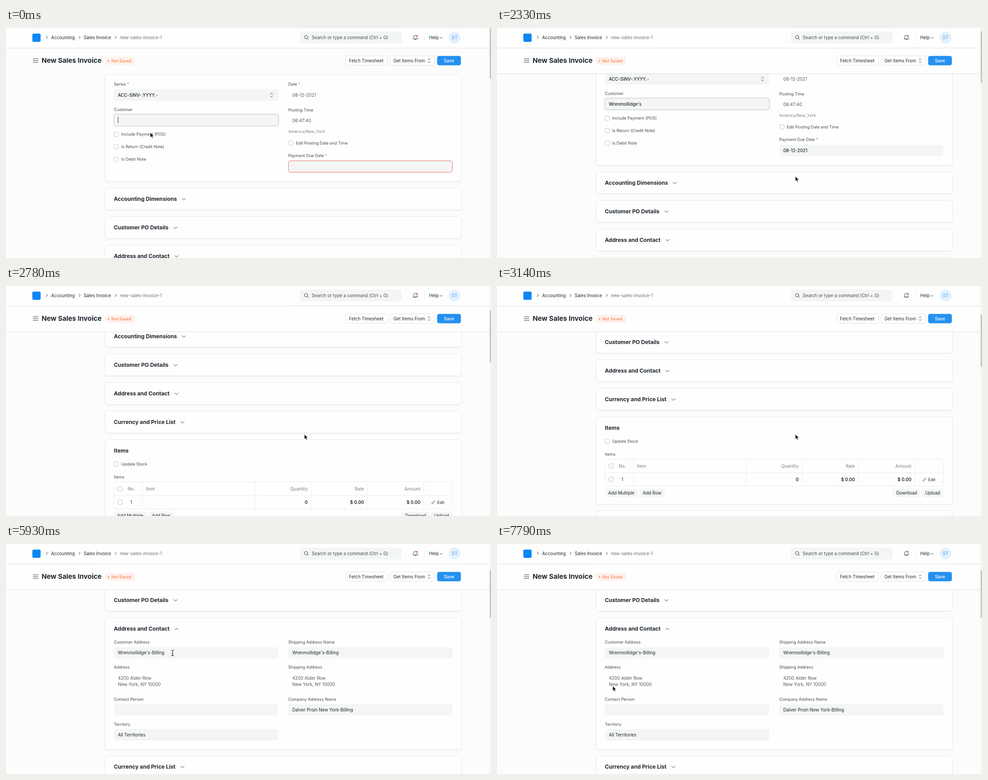
These frames come from a looping animation (1086x515 px, 8000 ms). An HTML page:

```html
<!DOCTYPE html>
<html lang="en">
<head>
<meta charset="utf-8">
<title>New Sales Invoice</title>
<style>
html, body { margin: 0; width: 100%; height: 100%; overflow: hidden; background: #fcfcfc; }
svg { display: block; width: 1086px; height: 515px; font-family: Inter, "Open Sans", sans-serif; }
text { white-space: pre; }
.card { fill: #fefefe; stroke: #e8ebec; filter: drop-shadow(0 1px 1px rgba(0, 0, 0, .07)); }
.field { fill: #f4f5f5; }
.line { fill: none; stroke: #e9ecee; }
.icon { fill: none; stroke: #333c44; stroke-linecap: round; stroke-linejoin: round; }
</style>
</head>
<body>
<svg id="stage" viewBox="0 0 1086 515" xmlns="http://www.w3.org/2000/svg"></svg>
<script>
const INK = '#1f272e', LABEL = '#414b54', VALUE = '#505a62', MUTED = '#78828b';
const SMALL = 9.12, BASE = 9.84, LARGE = 12.15, TITLE = 15.15;
const SHOP = "Wrenmollidge's", OWNER = 'Dalver Proin New York-Billing';
const STREET = '4200 Alder Row', CITY = 'New York, NY 10000';
const LOOP = 8000, EXPANDED = 3860, PICKED = 720, FILLED = 1250;

// Text is placed by its vertical centre.
const text = (x, cy, str, size = BASE, fill = INK, weight = 400, anchor = 'start', id = '') =>
  `<text ${id && `id="${id}"`} x="${x}" y="${cy + size * 0.364}" font-size="${size}" fill="${fill}" font-weight="${weight}" text-anchor="${anchor}">${str}</text>`;
const rect = (x, y, x2, y2, r, attrs) =>
  `<rect x="${x}" y="${y}" width="${x2 - x}" height="${y2 - y}" rx="${r}" ${attrs}/>`;
const path = (d, attrs = 'class="icon"') => `<path d="${d}" ${attrs}/>`;
const group = (id, body, attrs = '') => `<g id="${id}" ${attrs}>${body}</g>`;

const card = (y, y2) => rect(222, y, 1019.5, y2, 6, 'class="card"');
const field = (x, y, y2) => rect(x, y, x + 368, y2, 4.5, 'class="field"');
const label = (x, cy, str, required) =>
  text(x, cy, str + (required ? ' <tspan fill="#ec5f5f">*</tspan>' : ''), SMALL, LABEL);
const check = (x, cy, str) =>
  rect(x, cy - 5, x + 10, cy + 5, 3, 'fill="#fff" stroke="#bcc3c9"') +
  (str ? text(x + 16, cy, str, SMALL, LABEL) : '');
const updown = (x, y) => path(`M${x - 2.5} ${y - 2}l2.5 -2.5l2.5 2.5M${x - 2.5} ${y + 2}l2.5 2.5l2.5 -2.5`);
const chevron = (x, y, w, h, id = '') =>
  path(`M${x - w} ${y - h}l${w} ${2 * h}l${w} ${-2 * h}`, `class="icon" ${id && `id="${id}"`}`);
const crumb = x => path(`M${x - 1.5} 18l3 3l-3 3`);
const section = (y, title, cx, id) =>
  card(y, y + 49) + text(241.5, y + 25, title, LARGE, INK, 700) + chevron(cx, y + 25.3, 4, 2, id);
const button = (x, x2, str) =>
  rect(x, 775.5, x2, 793.5, 4.5, 'class="field"') +
  text((x + x2) / 2, 784.5, str, BASE, INK, 400, 'middle');
const headButton = (x, x2, str, tx) =>
  rect(x, 62.5, x2, 83.5, 4.5, 'fill="#fff" stroke="#dde1e4"') + text(tx, 73, str);

function mainCard() {
  const caret = rect(250.5, 199, 251.5, 213, 0, 'id="caret" fill="#222"');
  return card(105, 343) +
    label(241.5, 126, 'Series', true) + field(241.5, 137, 163) +
    text(250.5, 150, 'ACC-SINV-.YYYY.-', BASE, INK, 500) + updown(594.5, 150) +
    label(241.5, 183, 'Customer') +
    rect(241, 193, 610.3, 219.3, 5, 'fill="#f4f5f5" stroke="#cdd2d4" stroke-width="1.5"') +
    text(250.5, 206, '', BASE, INK, 500, 'start', 'customer') + caret +
    check(242, 238, 'Include Payment (POS)') +
    check(242, 266, 'Is Return (Credit Note)') +
    check(242, 294, 'Is Debit Note') +
    label(632, 126, 'Date', true) + text(641, 150.3, '08-12-2021', BASE, VALUE) +
    label(632, 183.5, 'Posting Time') + text(641, 207.5, '06:47:40', BASE, VALUE) +
    text(632, 231.5, 'America/New_York', SMALL, MUTED) +
    check(633, 257.5, 'Edit Posting Date and Time') +
    label(632, 286, 'Payment Due Date', true) +
    rect(632.3, 297.4, 999.5, 323, 4.5, 'id="due" class="field"') +
    text(641, 310.3, '08-12-2021', BASE, INK, 500, 'start', 'dueText');
}

function addressBody() {
  const half = (x, name, place) =>
    label(x, 541, name) + field(x, 552, 577.5) + text(x + 9, 564.5, SHOP + '-Billing') +
    label(x, 597, place) + text(x + 9, 621, STREET, BASE, VALUE) + text(x + 9, 635.3, CITY, BASE, VALUE) +
    field(x, 679.5, 705);
  return half(241.5, 'Customer Address', 'Address') + half(632, 'Shipping Address Name', 'Shipping Address') +
    label(241.5, 668.5, 'Contact Person') + label(632, 668.5, 'Company Address Name') +
    text(641, 692.3, OWNER) +
    label(241.5, 725, 'Territory') + field(241.5, 735.5, 761) + text(250.5, 748, 'All Territories');
}

function itemsCard() {
  const cols = [305.5, 557.5, 683.5, 809.5, 935.5].map(x => `M${x} 708.5V769`).join('');
  const right = (x, head, val) =>
    text(x, 724, head, BASE, MUTED, 400, 'end') + text(x, 754, val, BASE, INK, 600, 'end');
  return card(614, 810) + text(241.5, 639, 'Items', LARGE, INK, 700) +
    check(242, 668.5, 'Update Stock') + label(241.5, 697.5, 'Items') +
    rect(241.5, 708.5, 999.5, 769, 4.5, 'class="line"') +
    path('M241.5 739.5H999.5' + cols, 'class="line"') +
    check(250.5, 724) + check(250.5, 754) +
    text(280.5, 724, 'No.', BASE, MUTED, 400, 'middle') + text(280.5, 754, '1', BASE, INK, 400, 'middle') +
    text(313, 724, 'Item', BASE, MUTED) +
    right(675.5, 'Quantity', '0') + right(801.5, 'Rate', '$ 0.00') + right(928, 'Amount', '$ 0.00') +
    path('M953.7 757.6l.7 -2.5l4.3 -4.3l1.8 1.8l-4.3 4.3z', 'class="icon" stroke-width=".8"') +
    text(965.5, 754.3, 'Edit', SMALL) +
    button(241.7, 315, 'Add Multiple') + button(319, 375.5, 'Add Row') +
    button(886.5, 948, 'Download') + button(951.5, 999.5, 'Upload');
}

function dropdown() {
  return rect(241.5, 224, 609.5, 388.5, 4.5,
      'fill="#fff" style="filter:drop-shadow(0 2px 4px rgba(0,0,0,.14))"') +
    rect(245, 227.5, 606, 279, 4.5, 'class="field"') +
    text(253, 253, SHOP, BASE, INK, 600) +
    text(253, 306, '+ Create a new Customer') + text(253, 359, 'Advanced Search');
}

function header() {
  return rect(0, 45, 1086, 101.5, 0, 'id="head"') +
    path('M60.5 69H72M60.5 73H72M60.5 77H72') +
    text(79.7, 72.7, 'New Sales Invoice', TITLE, INK, 700) +
    rect(222, 65, 288.5, 82.5, 4.5, 'fill="#fef1ea"') +
    '<circle cx="229.5" cy="74" r="1.4" fill="#f5733d"/>' + text(236, 74, 'Not Saved', SMALL, '#f5733d') +
    headButton(760.5, 854.5, 'Fetch Timesheet', 768) + headButton(860.5, 959.5, 'Get Items From', 867.5) +
    updown(947.5, 73) +
    rect(965.4, 62.4, 1018.6, 83.6, 4.5, 'fill="#2490ef"') + text(992, 73, 'Save', BASE, '#fff', 500, 'middle');
}

function navbar() {
  return rect(0, 0, 1086, 44, 0, 'fill="#fefefe" style="filter:drop-shadow(0 1px 1px rgba(0,0,0,.1))"') +
    rect(59, 12.5, 77.5, 31, 3, 'fill="#0b87f4"') +
    crumb(91.5) + text(101, 21, 'Accounting') + crumb(164.8) + text(174, 21, 'Sales Invoice') +
    crumb(245.8) + text(255, 21, 'new-sales-invoice-1', BASE, '#66717a') +
    rect(657.5, 8, 886, 34.5, 6, 'class="field"') +
    '<circle cx="672" cy="20.5" r="3.7" class="icon"/>' + path('M674.8 23.3l2.7 2.7') +
    text(684.5, 21.3, 'Search or type a command (Ctrl + G)', BASE, '#434d56') +
    path('M911.5 24.5h10.5c-1.4 -1.3 -1.5 -2.2 -1.5 -4.5a3.8 3.8 0 0 0 -7.6 0c0 2.3 0 3.2 -1.4 4.5zM915.3 24.8a1.5 1.5 0 0 0 3 0') +
    '<circle cx="920" cy="17" r="1.6" fill="#e8504f"/>' +
    path('M936.5 12V31', 'class="line"') + text(947.5, 21.3, 'Help') + chevron(974.5, 22, 2.5, 1.2) +
    '<circle cx="1004.5" cy="21.2" r="13.2" fill="#e3f1fd"/>' + text(1004.5, 21.3, 'ST', 10.6, '#4c9fee', 400, 'middle');
}

document.getElementById('stage').innerHTML =
  rect(0, 0, 1086, 515, 0, 'fill="#fcfcfc"') +
  group('page',
    mainCard() + section(358, 'Accounting Dimensions', 398) + section(422, 'Customer PO Details', 379.5) +
    group('addressOpen', card(486, 781) + addressBody()) +
    group('addressShut', card(486, 535)) +
    text(241.5, 511, 'Address and Contact', LARGE, INK, 700) +
    chevron(382, 511.3, 4, 2, 'arrowShut') + path('M378 513.3l4 -4l4 4', 'class="icon" id="arrowOpen"') +
    group('below', section(550, 'Currency and Price List', 395) + itemsCard() + card(824, 873)) +
    group('list', dropdown())) +
  header() + navbar() +
  rect(1082.5, 0, 1086, 515, 0, 'fill="#f5f6f6"') + rect(1083, 0, 1086, 113, 0, 'id="thumb" fill="#c3c5c6"') +
  group('arrow', path('M0 0V11.2L2.6 8.8L4.3 12.8L6.3 12L4.6 8.1H8.2Z', 'fill="#111" stroke="#fff" stroke-width=".8"')) +
  group('beam', ['stroke="#fff" stroke-width="2.6"', 'stroke="#222" stroke-width="1.1"'].map(s =>
    path('M-3 -6.3Q0 -6.3 0 -4.3V4.3Q0 6.3 -3 6.3M3 -6.3Q0 -6.3 0 -4.3M0 4.3Q0 6.3 3 6.3M-1.5 1.5H1.5', `fill="none" ${s}`)).join(''));

const $ = id => document.getElementById(id);
const show = (id, on) => $(id).setAttribute('display', on ? 'inline' : 'none');
const move = (id, x, y) => $(id).setAttribute('transform', `translate(${x} ${y})`);

const SCROLL = [[2150, 0], [2240, 9], [2330, 36], [2510, 130], [2690, 233], [2780, 270], [2960, 304], [3050, 315], [3140, 321]];
const POINTER = [
  [0, 323, 234], [810, 323, 234], [990, 325, 238], [1070, 328, 242], [1250, 400, 272], [1430, 520, 310],
  [1610, 625, 334], [1700, 650, 335], [1880, 668, 332], [3140, 668, 332], [3230, 660, 312], [3410, 605, 222],
  [3590, 570, 178], [4040, 570, 178], [4130, 555, 185], [4400, 400, 225], [4670, 285, 261], [4850, 271, 258],
  [5030, 258, 250], [5300, 310, 240], [5570, 385, 237], [5660, 387, 238], [5840, 387, 238], [5930, 373, 244],
  [6200, 320, 262], [6500, 250, 290], [6720, 252, 302], [6900, 270, 312], [7200, 298, 318],
  [7610, 284, 319], [7790, 259, 318]
];

function sample(keys, t) {
  const i = keys.findIndex(k => k[0] > t);
  if (i < 0) return keys[keys.length - 1].slice(1);
  if (i === 0) return keys[0].slice(1);
  const a = keys[i - 1], b = keys[i], p = (t - a[0]) / (b[0] - a[0]);
  return a.slice(1).map((v, n) => v + (b[n + 1] - v) * p);
}

function tick(t) {
  const base = [7610, 6720, 1070, 0].find(b => b <= t);
  return base + Math.floor((t - base) / 90) * 90;
}

function draw(t) {
  const [scroll] = sample(SCROLL, t), [x, y] = sample(POINTER, t);
  const open = t >= EXPANDED, filled = t >= FILLED;

  const typed = t >= PICKED ? SHOP : SHOP.toLowerCase().slice(0, Math.min(5, Math.floor(t / 90)));
  if ($('customer').textContent !== typed) $('customer').textContent = typed;
  $('caret').setAttribute('x', 250.5 + (typed ? $('customer').getComputedTextLength() : 0));
  show('caret', !filled);
  show('list', t >= 180 && t < PICKED);

  $('due').setAttribute('stroke', filled ? 'none' : '#ee6b6b');
  show('dueText', filled);

  move('page', 0, -scroll);
  show('addressOpen', open);
  show('arrowOpen', open);
  show('addressShut', !open);
  show('arrowShut', !open);
  move('below', 0, open ? 245 : 0);

  $('head').setAttribute('fill', scroll ? '#fefefe' : '#fcfcfc');
  $('head').style.filter = scroll ? 'drop-shadow(0 1px 1px rgba(0,0,0,.1))' : 'none';
  $('thumb').setAttribute('y', scroll * (open ? 0.184 : 0.201));
  $('thumb').setAttribute('height', open ? 106 : filled ? 116 : t >= 990 ? 108 : 113);

  const beam = open && x > 242 && x < 609 && y > 231 && y < 256;
  show('beam', beam);
  show('arrow', !beam);
  move(beam ? 'beam' : 'arrow', x, y);
}

const start = performance.now();
function loop() {
  draw(tick((performance.now() - start) % LOOP));
  requestAnimationFrame(loop);
}
loop();
</script>
</body>
</html>
```
